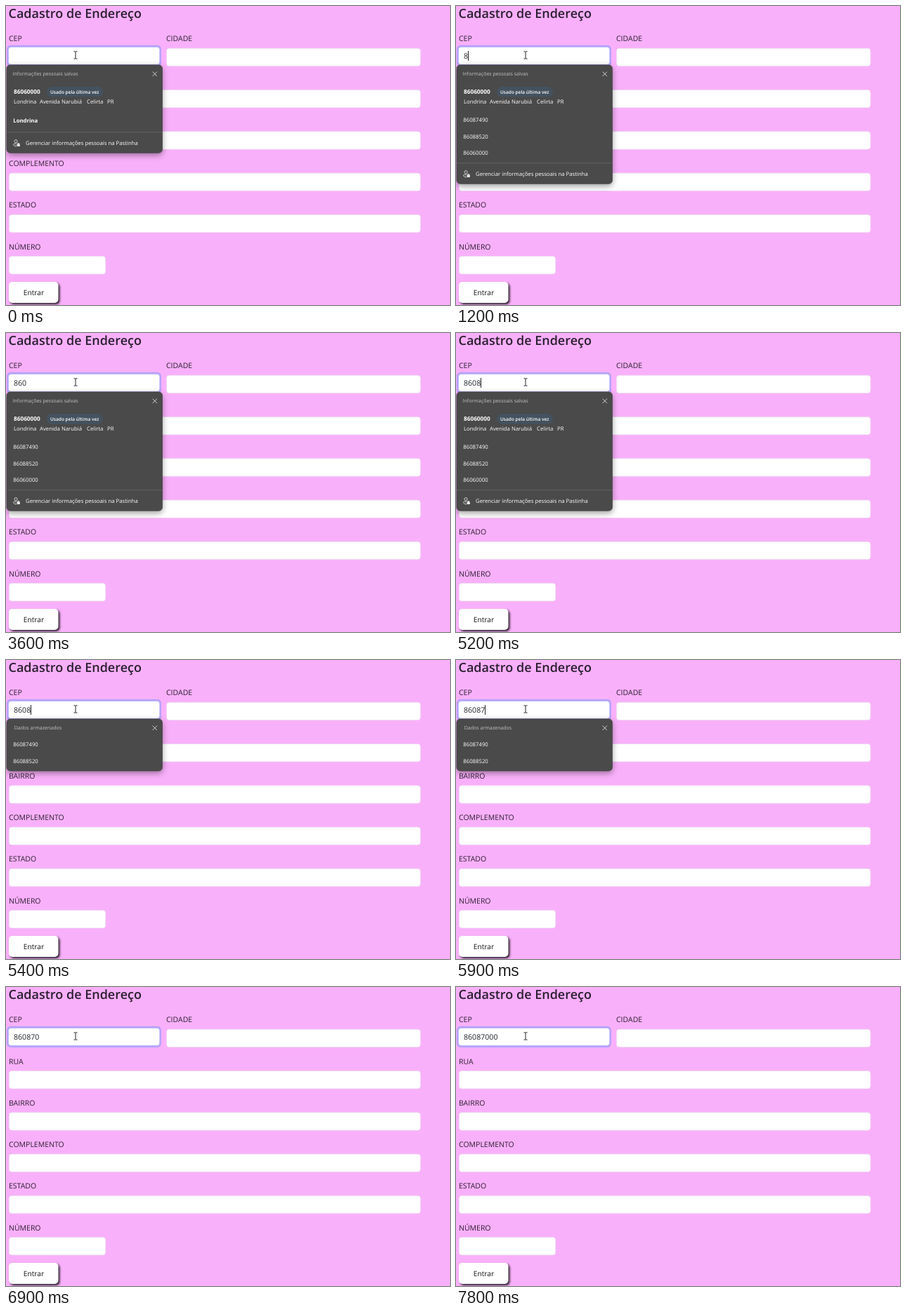
These frames come from a looping animation (632 px wide and 426 px high, 8000 ms). An HTML page:

```html
<!DOCTYPE html>
<html lang="pt-BR">
<head>
<meta charset="utf-8">
<title>Cadastro de Endereço</title>
<style>
  html, body { margin: 0; width: 100%; height: 100%; overflow: hidden; background: #f9b0fa; }
  svg { display: block; width: 632px; height: 426px; }
  text {
    font-family: "Open Sans", "Noto Sans", sans-serif;
    text-rendering: geometricPrecision;
    white-space: pre;
  }
  .label { font-size: 10.5px; fill: #2b2030; }
  .field { fill: #fff; stroke: #e9d5ef; stroke-width: .7px; }
  .panel { fill: #4a4a4a; stroke: #3e3e3e; stroke-width: .7px;
           filter: drop-shadow(0 3px 4px rgba(0, 0, 0, .38)); }
  .head { font-size: 7.05px; fill: #c4c4c4; }
  .item { font-size: 7.75px; fill: #fff; }
  .strong { font-weight: 700; }
  .line { fill: none; stroke: #dcdcdc; stroke-width: .9px; }
  .button { fill: #fff; filter: drop-shadow(2.5px 2.5px 1.5px rgba(0, 0, 0, .85)); }
</style>
</head>
<body>
<svg id="stage" viewBox="0 0 632 426"></svg>
<script>
const LOOP = 8000;
const DIGIT = 6.05;
const stage = document.getElementById('stage');

// time, typed text, caret visible
const typing = [
  [0, '', false], [500, '', true], [800, '8', true], [1700, '86', true],
  [2400, '86', false], [3000, '86', true], [3400, '860', true], [3600, '860', false],
  [5200, '8608', true], [5900, '86087', true], [6400, '860870', true],
  [6900, '860870', false], [7400, '86087000', true], [7800, '86087000', false]
];

// time, visible popup
const popupSteps = [
  [0, 'saved'], [1200, 'matches'], [5400, 'two'], [6100, 'one'], [6900, 'none']
];

function add(parent, tag, attrs, content) {
  const el = document.createElementNS('http://www.w3.org/2000/svg', tag);
  for (const key in attrs) el.setAttribute(key, attrs[key]);
  if (content) el.textContent = content;
  parent.appendChild(el);
  return el;
}

function write(parent, x, y, content, cls, extra) {
  return add(parent, 'text', { x, y, class: cls, ...extra }, content);
}

function box(parent, x, y, width, height, rx, cls, extra) {
  return add(parent, 'rect', { x, y, width, height, rx, class: cls, ...extra });
}

function drawForm() {
  write(stage, 3.5, 17.4, 'Cadastro de Endereço', '',
    { 'font-size': 18, 'font-weight': 600, fill: '#2a1f30' });
  write(stage, 4, 50.3, 'CEP', 'label');
  write(stage, 228, 50.3, 'CIDADE', 'label');
  box(stage, 228.5, 60.3, 361.5, 25.4, 4, 'field');
  ['RUA', 'BAIRRO', 'COMPLEMENTO', 'ESTADO', 'NÚMERO'].forEach((name, i) => {
    const y = 59.25 * (i + 1);
    write(stage, 4, 50.3 + y, name, 'label');
    box(stage, 4.3, 60.3 + y, name === 'NÚMERO' ? 137.5 : 585.7, 25.4, 4, 'field');
  });
  box(stage, 4, 393, 70.5, 30, 5, 'button');
  write(stage, 24.8, 412, 'Entrar', '', { 'font-size': 10.2, fill: '#111' });
  box(stage, 1, 55.8, 220, 30.4, 5.5, '', { fill: '#b9a2fa' });
  box(stage, 3.4, 58.4, 215.4, 25.2, 4, '', { fill: '#fff', stroke: '#a9a8fb', 'stroke-width': .7 });
}

function makePopup(bottom, title, titleX) {
  const g = add(stage, 'g', {});
  box(g, 1, 84, 221.5, bottom - 84, 5, 'panel');
  write(g, titleX, 99.3, title, 'head');
  add(g, 'path', { d: 'M208.6 93.6l6.4 6.4m0-6.4l-6.4 6.4', class: 'line' });
  return g;
}

function addRows(g, top, codes) {
  codes.forEach((code, i) => write(g, 10.3, top + 23.5 * i, code, 'item'));
}

function makeSaved(bottom) {
  const g = makePopup(bottom, 'Informações pessoais salvas', 9.5);
  write(g, 11, 124.9, '86060000', 'item strong', { style: 'font-size:8.25px' });
  box(g, 58, 115, 80, 14.4, 7.2, '', { fill: '#44525f' });
  write(g, 63, 124.5, 'Usado pela última vez', '',
    { 'font-size': 6.55, 'font-weight': 600, fill: '#fff' });
  [[11, 'Londrina'], [48, 'Avenida Narubiá'], [115, 'Celirta'], [144, 'PR']]
    .forEach(([x, part]) => write(g, x, 139.1, part, 'item'));

  const rule = bottom - 29.5;
  add(g, 'path', { d: `M1.5 ${rule}H222`, stroke: '#6b6b6b', 'stroke-width': .8 });
  const icon = add(g, 'g', { transform: `translate(10 ${bottom - 19})` });
  add(icon, 'circle', { cx: 4, cy: 2.4, r: 2.1, class: 'line' });
  add(icon, 'path', { d: 'M5 6.1H1.5Q.5 6.1 .5 7.4Q1 9.6 5 9.6', class: 'line' });
  box(icon, 5.6, 6, 4.2, 3.8, .6, '', { fill: '#eee' });
  add(icon, 'path', { d: 'M6.7 6V5.2h2V6', class: 'line' });
  write(g, 28, bottom - 11.2, 'Gerenciar informações pessoais na Pastinha', 'item');
  return g;
}

function makeStored(bottom, codes) {
  const g = makePopup(bottom, 'Dados armazenados', 11.7);
  addRows(g, 123, codes);
  return g;
}

drawForm();
const value = write(stage, 11, 75, '', '', { 'font-size': 10.6, fill: '#212529' });
const caret = box(stage, 0, 64, 1, 14, 0, '', { fill: '#222' });
add(stage, 'path', {
  d: 'M96.5 64.8h1.6l.9.7.9-.7h1.6M99 65.5v9M96.5 75.2h1.6l.9-.7.9.7h1.6',
  fill: 'none', stroke: '#222', 'stroke-width': 1
});

const popups = {
  saved: makeSaved(209.3),
  matches: makeSaved(253.3),
  two: makeStored(158, ['86087490', '86088520']),
  one: makeStored(134.7, ['86087490'])
};
write(popups.saved, 10.3, 166, 'Londrina', 'item strong');
addRows(popups.matches, 165.2, ['86087490', '86088520', '86060000']);

function stepAt(steps, t) {
  return steps.filter(step => step[0] <= t).pop();
}

function render(now) {
  const t = now % LOOP;
  const [, typed, caretOn] = stepAt(typing, t);
  const [, shown] = stepAt(popupSteps, t);
  if (value.textContent !== typed) value.textContent = typed;
  caret.setAttribute('x', Math.floor(11 + DIGIT * typed.length));
  caret.setAttribute('visibility', caretOn ? 'visible' : 'hidden');
  for (const name in popups) {
    popups[name].setAttribute('display', name === shown ? 'inline' : 'none');
  }
}

const start = performance.now();
function tick() {
  render(performance.now() - start);
  requestAnimationFrame(tick);
}
tick();
</script>
</body>
</html>
```
